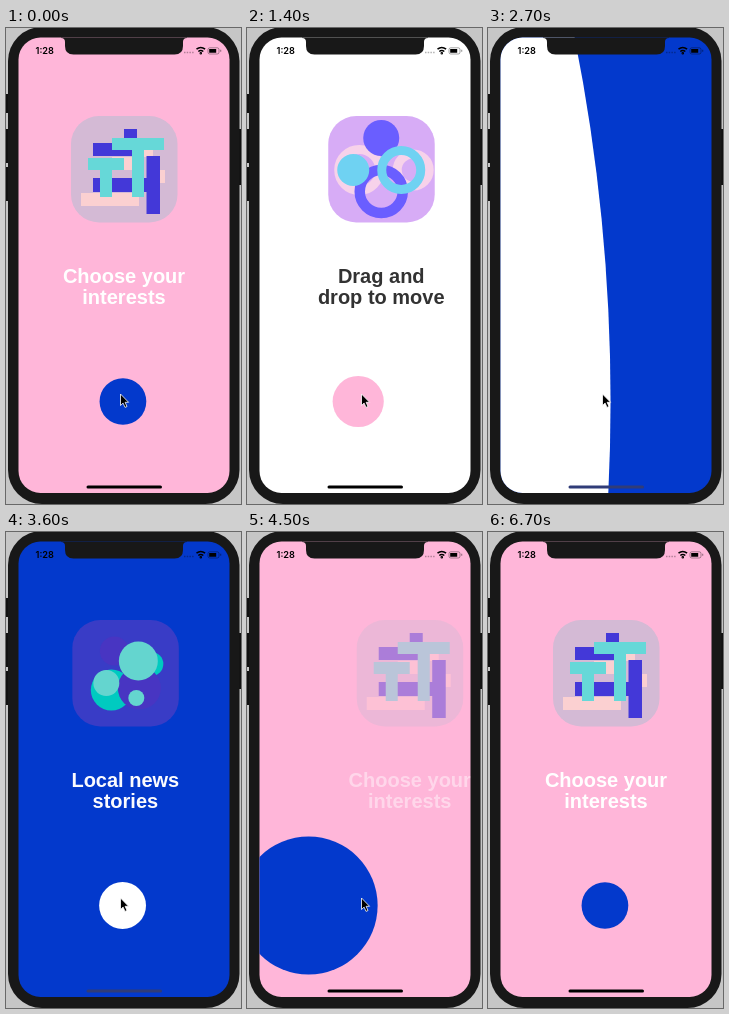
An HTML page for the animation above (6.8 s loop, 235 px wide and 476 px high).

```html
<!DOCTYPE html>
<html lang="en">
<head>
<meta charset="utf-8">
<title>Onboarding</title>
<style>
html, body { margin: 0; width: 100%; height: 100%; overflow: hidden; background: #c6c6c6; }
svg { display: block; width: 235px; height: 476px; }
.page text { font: bold 20px "Liberation Sans", Arial, sans-serif; text-anchor: middle; }
.clock { font: 600 9.2px Inter, "Liberation Sans", sans-serif; }
</style>
</head>
<body>
<svg viewBox="0 0 235 476">
  <defs>
    <clipPath id="screen"><rect x="12.5" y="9.5" width="211" height="455.5" rx="22"/></clipPath>
  </defs>

  <!-- phone body -->
  <g fill="#111">
    <path d="M0 66h4v19h-4zM0 101h4v34h-4zM0 139h4v34h-4zM231 101h4v56h-4z"/>
    <rect x="2" y="-1" width="231.5" height="477" rx="34" fill="#181818"/>
  </g>

  <g clip-path="url(#screen)">
    <rect id="back" width="235" height="476"/>
    <circle id="dot" cy="373.5"/>

    <g class="page" fill="#fff">
      <rect x="65" y="88" width="106.500" height="106.500" rx="28" fill="#d4bad5"/>
      <path fill="#fbd0d1" d="M75 165h58v13h-58zM147 142h12v13h-12zM106 129h20v13h-20zM138 122h9v7h-9z"/>
      <path fill="#4338d8" d="M118 101h13v10h-13zM87 115h40v13h-40zM87 150h54v14h-54zM140.500 128h13.500v58h-13.500z"/>
      <path fill="#66d8d8" d="M106 110h52v12h-20v47h-12v-47h-20zM82 130h36v12h-12v27h-12v-27h-12z"/>
      <text x="118" y="255">Choose your</text>
      <text x="118" y="275.5">interests</text>
    </g>

    <g class="page">
      <rect x="65" y="88" width="106.500" height="106.500" rx="28" fill="#ce98f5"/>
      <g fill="none">
        <circle cx="96" cy="142" r="20.500" stroke="#f6c8e6" stroke-width="9"/>
        <circle cx="150" cy="142" r="16" stroke="#f6c8e6" stroke-width="9"/>
        <circle cx="118" cy="110" r="18" fill="#4636ff"/>
        <circle cx="118" cy="163.500" r="21.500" stroke="#4636ff" stroke-width="10.500"/>
        <circle cx="138" cy="142" r="19.500" stroke="#4cc8ef" stroke-width="9"/>
        <circle cx="90" cy="142" r="16" fill="#4cc8ef"/>
      </g>
      <text x="118" y="255">Drag and</text>
      <text x="118" y="275.5">drop to move</text>
    </g>

    <g class="page" fill="#fff">
      <rect x="65" y="88" width="106.500" height="106.500" rx="28" fill="#3a3dc6"/>
      <circle cx="107" cy="119" r="14.500" fill="#4a35c2"/>
      <circle cx="144" cy="132" r="12" fill="#00cdc0"/>
      <circle cx="104" cy="158" r="20.500" fill="#00cdc0"/>
      <circle cx="132" cy="156" r="21.500" fill="#4a35c2"/>
      <circle cx="131" cy="129" r="19.500" fill="#66d8d0"/>
      <circle cx="99" cy="151" r="13" fill="#66d8d0"/>
      <circle cx="129" cy="166" r="8" fill="#66d8d0"/>
      <text x="118" y="255">Local news</text>
      <text x="118" y="275.5">stories</text>
    </g>

    <!-- status bar -->
    <path fill="#181818" d="M55 9h126v1q-4 0-4 4v4q0 8.500-8.500 8.500h-101q-8.500 0-8.500-8.500v-4q0-4-4-4z"/>
    <text class="clock" x="29.5" y="26">1:28</text>
    <path stroke="#000" stroke-opacity=".3" stroke-width="1.500" stroke-dasharray="1.500 1.200" d="M178 24.500h10"/>
    <g fill="none" stroke="#000" stroke-width="1.600">
      <path d="M190.500 21.200q4.300-3.400 8.600 0M192.300 23.500q2.500-2 5 0"/>
      <circle cx="194.800" cy="25.300" r=".5"/>
      <rect x="202" y="19.800" width="11" height="6.200" rx="1.800" stroke-width=".8" stroke-opacity=".45"/>
    </g>
    <path d="M203.200 21h7v3.800h-7z"/>
    <path d="M214.300 21.800h.9v2h-.9z" opacity=".5"/>
    <rect id="home" x="80.500" y="457.500" width="75.500" height="3" rx="1.500"/>
  </g>

  <path id="cursor" d="M114.500 366v11.500l2.600-2.400 1.900 4.300 2-.9-1.900-4.200h3.500z" stroke="#fff" stroke-width=".8"/>
</svg>

<script>
const LOOP = 6800, DURATION = 1663, STARTS = [298, 2113, 3693], CURSOR_END = 5700;
const COLORS = ['#ffb6d9', '#ffffff', '#0339cc'];
const WIDTH = 211, CENTER = 117.5, RADIUS = 22.8, POINTS = 375 / WIDTH, GROWTH = 15;
const $ = id => document.getElementById(id);
const pages = document.querySelectorAll('.page');

const bezier = (s, a, b) => 3 * (1 - s) ** 2 * s * a + 3 * (1 - s) * s * s * b + s ** 3;

// cubic-bezier(.25, .1, .25, 1)
function ease(x) {
  if (x >= 1) return 1;
  let lo = 0, hi = 1;
  for (let i = 0; i < 24; i++) {
    const mid = (lo + hi) / 2;
    if (bezier(mid, .25, .25) < x) lo = mid; else hi = mid;
  }
  return bezier(lo, .1, 1);
}

function set(el, attrs) {
  for (const key in attrs) el.setAttribute(key, attrs[key]);
}

function draw() {
  const t = performance.now() % LOOP;
  const step = STARTS.filter(s => s <= t).length - 1;
  const from = step < 0 ? 2 : step, to = (from + 1) % 3;
  const u = step < 0 ? 1 : ease((t - STARTS[step]) / DURATION);

  // The next colour grows to the right, then the previous one shrinks from the left.
  const growing = u < .5;
  const near = Math.abs(1 - 2 * u);
  const r = RADIUS + 2 ** (GROWTH * (1 - near)) / POINTS;
  const side = growing ? 1 : -1;
  set($('back'), { fill: COLORS[growing ? from : to] });
  set($('dot'), { fill: COLORS[growing ? to : from], r, cx: CENTER + side * (r - near * RADIUS) });

  pages.forEach((page, i) => {
    const shift = i === from ? -u : i === to ? 1 - u : 1;
    set(page, {
      transform: `translate(${shift * WIDTH})`,
      opacity: Math.max(0, 1 - 2.6 * Math.abs(shift))
    });
  });

  const onBlue = (growing ? from : to) === 2;
  set($('home'), { fill: onBlue ? '#303c78' : '#000' });
  set($('cursor'), { opacity: t < CURSOR_END ? 1 : 0 });
  requestAnimationFrame(draw);
}
draw();
</script>
</body>
</html>
```
